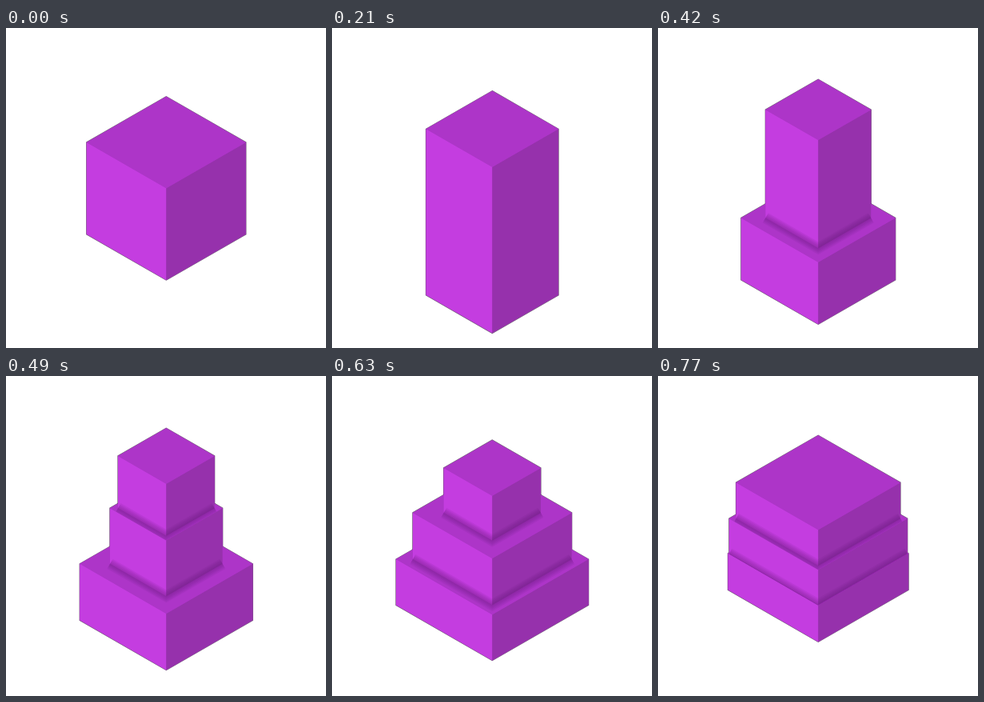
Recreate the animation shown at these times as an HTML page with a canvas. Size 400 px wide and 400 px high, loop 0.84 s.

```html
<!DOCTYPE html>
<html lang="en">
<head>
<meta charset="utf-8">
<title>Stacked cube</title>
<style>
  html, body { margin: 0; width: 100%; height: 100%; overflow: hidden; background: #fff; }
  canvas { display: block; width: 400px; height: 400px; }
</style>
</head>
<body>
<canvas id="stage" width="400" height="400"></canvas>
<script>
const ctx = document.getElementById('stage').getContext('2d');
const STEP = 70, STEPS = 12, CX = 200.3, ISO = 0.575;
const COLOR = { top: '#ad35c8', left: '#c43de0', right: '#9631ac' };

// Half width: every slab shrinks steadily, then swells; lower slabs swell first.
function halfWidth(i, k) {
  const order = 2 - i;
  const start = 4.45 + 2.1 * order;
  const span = 5.9 - 0.57 * order * order;
  const swell = Math.sin(Math.max(0, k - start) / span * Math.PI / 2);
  return 99.5 - 5.6 * k + 76 * swell;
}

// Centre heights of the top, the two seams and the bottom.
function levels(k) {
  const lift = k < 7
    ? (1 - Math.cos(Math.PI * k / 7)) / 2
    : 1 - ((k - 7) / 5) ** 1.15;
  const drop = Math.min(1, k / 3, (STEPS - k) / 8);
  const spread = 13.56 * Math.sqrt(13.6 - k);
  return [143 - 43 * lift, 200 - spread, 200 + spread, 257.8 + 76 * drop];
}

// Neighbouring slabs of equal width form one block.
function blocks(k) {
  const y = levels(k), list = [];
  for (let i = 0; i < 3; i++) {
    const w = halfWidth(i, k), last = list[list.length - 1];
    if (last && Math.abs(last.w - w) < 0.5) last.bottom = y[i + 1];
    else list.push({ w, top: y[i], bottom: y[i + 1] });
  }
  return list.reverse();
}

function shape(...pts) {
  const p = new Path2D();
  pts.forEach(([x, y]) => p.lineTo(x, y));
  p.closePath();
  return p;
}

function fill(path, color) {
  ctx.fillStyle = color;
  ctx.fill(path);
}

function geometry({ w, top, bottom }) {
  const d = w * ISO, l = CX - w, r = CX + w;
  return {
    outline: shape([CX, top - d], [r, top], [r, bottom], [CX, bottom + d], [l, bottom], [l, top]),
    lid: shape([CX, top - d], [r, top], [CX, top + d], [l, top]),
    left: shape([l, top], [CX, top + d], [CX, bottom + d], [l, bottom]),
    right: shape([CX, top + d], [r, top], [r, bottom], [CX, bottom + d]),
    foot: new Path2D(`M${l} ${bottom}L${CX} ${bottom + d}L${r} ${bottom}`)
  };
}

// Soft shade where a block stands on the one below.
function contact(block, below) {
  const area = new Path2D(below.lid);
  area.addPath(block.outline);
  ctx.save();
  ctx.clip(area);
  ctx.strokeStyle = 'rgba(100, 25, 120, 0.1)';
  for (let w = 14; w > 1; w -= 3) {
    ctx.lineWidth = w;
    ctx.stroke(block.foot);
  }
  ctx.restore();
}

function draw(k) {
  const list = blocks(k).map(geometry);
  ctx.fillStyle = '#fff';
  ctx.fillRect(0, 0, 400, 400);

  // Dark rim, visible only outside the faces.
  ctx.strokeStyle = 'rgba(60, 25, 70, 0.7)';
  ctx.lineWidth = 1.4;
  list.forEach(b => ctx.stroke(b.outline));

  list.forEach((b, i) => {
    fill(b.outline, COLOR.top);
    fill(b.left, COLOR.left);
    fill(b.right, COLOR.right);
    fill(b.lid, COLOR.top);
    if (i) contact(b, list[i - 1]);
  });
}

const start = performance.now();
function tick() {
  const t = Math.max(0, performance.now() - start);
  draw(Math.floor(t / STEP) % STEPS);
  requestAnimationFrame(tick);
}
tick();
</script>
</body>
</html>
```
